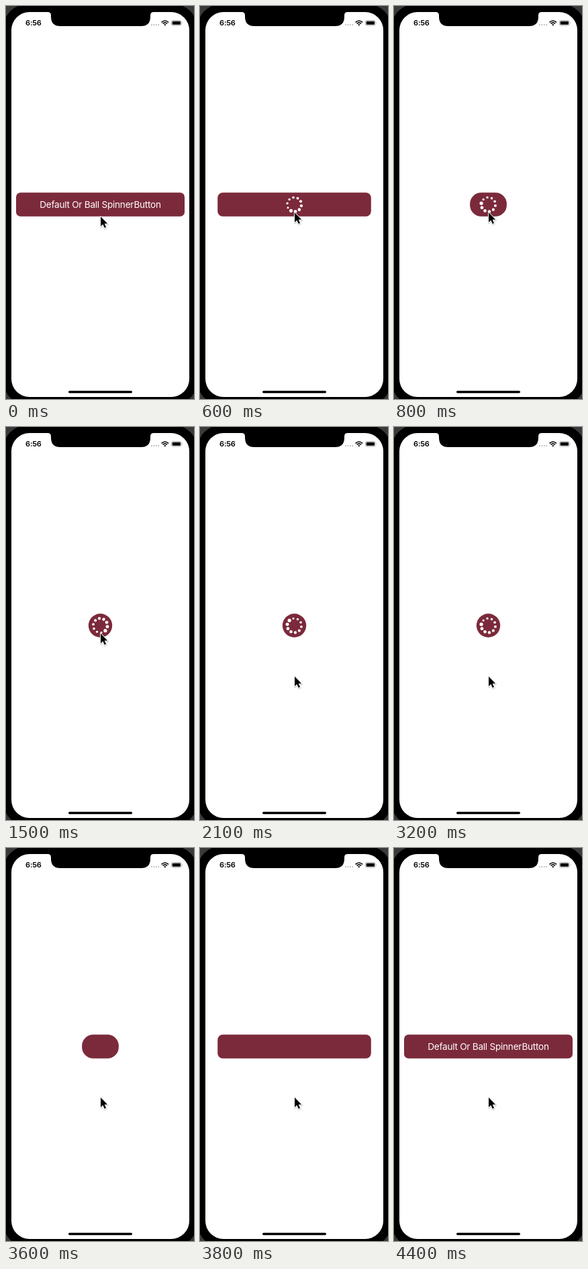
An HTML page for the animation above (4500 ms loop, 280 px wide and 586 px high).

```html
<!DOCTYPE html>
<html lang="en">
<head>
<meta charset="utf-8">
<title>Spinner button</title>
<style>
  html, body { margin: 0; width: 100%; height: 100%; overflow: hidden; background: #000; }
  svg { display: block; width: 280px; height: 586px; }
  text { font-family: Inter, Roboto, sans-serif; }
  .clock { font-size: 11px; font-weight: 600; letter-spacing: -.15px; }
  .label { font-size: 13.6px; letter-spacing: -.25px; fill: #fff; text-anchor: middle; }
</style>
</head>
<body>
<svg viewBox="0 0 280 586">
  <!-- phone body and screen -->
  <rect width="280" height="586" fill="#3a3a3a"/>
  <rect x="-4" y="-3" width="289" height="598" rx="36"/>
  <rect x="8" y="9" width="265" height="574" rx="27" fill="#fff"/>
  <path d="M62 8V9Q67 9 67 14V16Q67 30 81 30H201Q215 30 215 16V14Q215 9 220 9V8Z"/>
  <rect x="93" y="573.8" width="95" height="3.4" rx="1.7"/>

  <!-- status bar -->
  <text class="clock" x="29" y="29">6:56</text>
  <g fill="#b5b5b5">
    <circle cx="217" cy="28" r="1"/><circle cx="220.4" cy="28" r="1"/>
    <circle cx="223.8" cy="28" r="1"/><circle cx="227.2" cy="28" r="1"/>
  </g>
  <g fill="none" stroke="#000" stroke-width="1.6">
    <path d="M231.6 24.4Q236.8 19.6 242 24.4"/>
    <path d="M233.5 26.4Q236.8 23.4 240.1 26.4"/>
  </g>
  <path d="M235.1 27.7Q236.8 26.3 238.5 27.7L236.8 29.4Z"/>
  <rect x="246.4" y="21.6" width="14.8" height="7.4" rx="2.2" fill="none" stroke="#999" stroke-width=".8"/>
  <rect x="247.6" y="22.8" width="12.4" height="5" rx="1.1"/>
  <path d="M262 24Q263.4 25.3 262 26.6Z" fill="#999"/>

  <!-- button -->
  <rect id="button" y="278.3" height="35.4" fill="#7b2a3b"/>
  <text id="label" class="label" x="140.5" y="301">Default Or Ball SpinnerButton</text>
  <g id="spinner" fill="#fff"></g>

  <g id="cursor">
    <path d="M0 0V14.6L3.4 11.4L5.7 16.8L8 15.8L5.7 10.6H10.2Z" transform="translate(.4 1)"
      fill="none" stroke="#000" stroke-opacity=".14" stroke-width="3.2" stroke-linejoin="round"/>
    <path d="M0 0V14.6L3.4 11.4L5.7 16.8L8 15.8L5.7 10.6H10.2Z"
      stroke="#fff" stroke-width="1.8" stroke-linejoin="round" paint-order="stroke"/>
  </g>
</svg>
<script>
  const LOOP = 4500, STEP = 100;
  const CENTER = { x: 140.5, y: 296 };
  const DOTS = 10, RING = 10.6, SPIN = 1200;
  const COLLAPSE = 535, EXPAND = 3540, RESIZE = 325;

  const get = id => document.getElementById(id);
  const button = get('button'), label = get('label');
  const spinner = get('spinner'), cursor = get('cursor');

  const clamp = v => Math.min(1, Math.max(0, v));
  const mix = (a, b, p) => a + (b - a) * p;
  const smooth = p => p * p * (3 - 2 * p);
  const ease = (t, start, span) => smooth(clamp((t - start) / span));

  const dots = Array.from({ length: DOTS }, (_, i) => {
    const dot = document.createElementNS('http://www.w3.org/2000/svg', 'circle');
    const angle = (i * 360 / DOTS - 98) * Math.PI / 180;
    dot.setAttribute('cx', CENTER.x + RING * Math.cos(angle));
    dot.setAttribute('cy', CENTER.y + RING * Math.sin(angle));
    return spinner.appendChild(dot);
  });

  function drawButton(t) {
    const round = ease(t, COLLAPSE, RESIZE) - ease(t, EXPAND, RESIZE);
    const width = mix(251, 35.4, round);
    button.setAttribute('x', CENTER.x - width / 2);
    button.setAttribute('width', width);
    button.setAttribute('rx', mix(6.5, 17.7, round));
    label.style.display = t < COLLAPSE || t >= EXPAND + RESIZE ? '' : 'none';
  }

  // The largest dot leads clockwise; the ones behind it shrink.
  function drawSpinner(t) {
    spinner.style.display = t >= COLLAPSE && t < EXPAND ? '' : 'none';
    const head = 8.2 + (t - 800) * DOTS / SPIN;
    dots.forEach((dot, i) => {
      const lag = (((head - i) % DOTS) + DOTS) % DOTS / DOTS;
      dot.setAttribute('r', mix(2.6, 1.45, lag));
    });
  }

  function drawCursor(t) {
    const y = 314 - 6 * ease(t, 0, 400) + 64 * ease(t, 1500, 300);
    cursor.setAttribute('transform', `translate(141 ${y})`);
  }

  const begin = performance.now();
  function draw(now) {
    const time = Math.max(0, now - begin) % LOOP;
    const t = Math.floor(time / STEP) * STEP;
    drawButton(t);
    drawSpinner(t);
    drawCursor(t);
    requestAnimationFrame(draw);
  }
  draw(begin);
</script>
</body>
</html>
```
